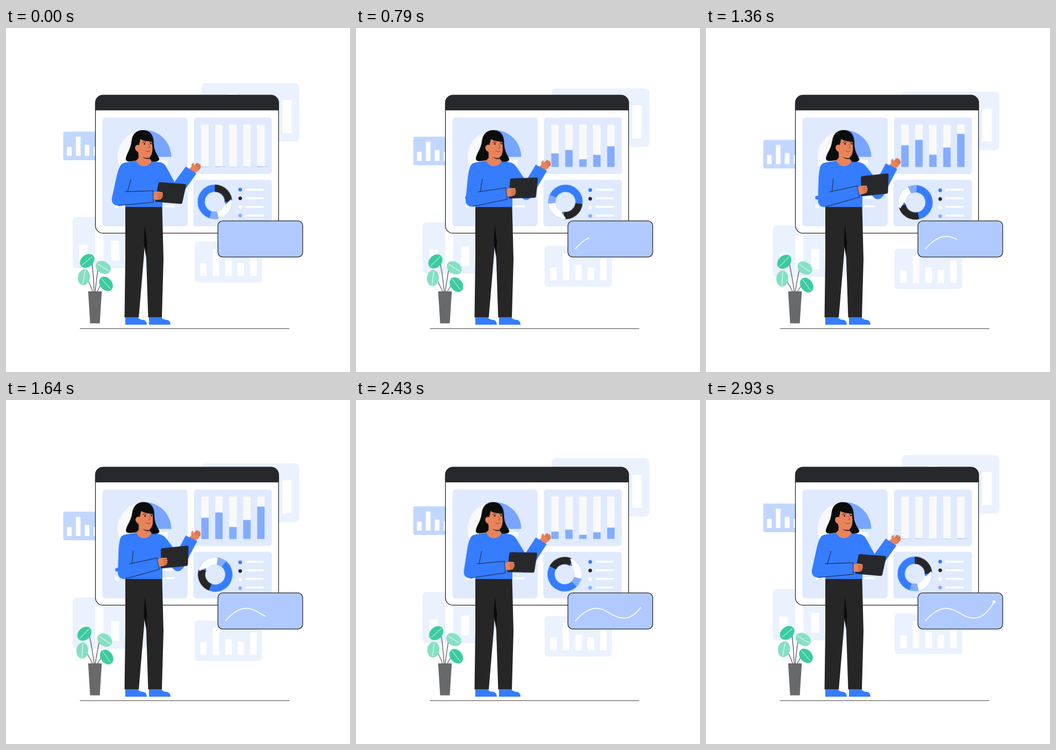
Write an HTML page without scripts that moves like this. It is 640x640 px and loops after 3 s.

```html
<!DOCTYPE html>
<html lang="en">
<head>
<meta charset="utf-8">
<title>Presenting a dashboard</title>
<style>
  html, body { margin: 0; width: 100%; height: 100%; overflow: hidden; background: #fff; }
  svg { display: block; width: 100%; height: 100%; }

  .drift, .sway, .grow rect { animation: 3s infinite; }
  .drift { --d: 16px; animation-name: drift; }
  .sway { animation-name: sway; }
  .grow rect { transform-origin: 0 258.6px; animation-name: grow; }
  .spin { transform-origin: 389px 324px; animation: spin 3s linear infinite; }
  .draw { stroke-dasharray: 1 2; animation: draw 3s linear infinite; }
  .end { animation: end 3s step-end infinite; }

  /* out and back, with a short rest before the loop restarts */
  @keyframes drift {
    0% { transform: none; animation-timing-function: cubic-bezier(.25, 0, .65, 1); }
    48.83% { transform: translateY(var(--d)); animation-timing-function: cubic-bezier(.35, 0, .75, 1); }
    97.67%, 100% { transform: none; }
  }
  @keyframes sway {
    0% { transform: rotate(0deg); animation-timing-function: cubic-bezier(.25, 0, .65, 1); }
    48.83% { transform: rotate(var(--a)); animation-timing-function: cubic-bezier(.35, 0, .75, 1); }
    97.67%, 100% { transform: rotate(0deg); }
  }
  @keyframes grow {
    0% { transform: scaleY(.02); animation-timing-function: cubic-bezier(.25, 0, .65, 1); }
    48.83% { transform: none; animation-timing-function: cubic-bezier(.35, 0, .75, 1); }
    97.67%, 100% { transform: scaleY(.02); }
  }
  @keyframes spin {
    97.67%, 100% { transform: rotate(360deg); }
  }
  @keyframes draw {
    0% { stroke-dashoffset: 1.05; }
    8.3% { stroke-dashoffset: 1.02; }
    16.67% { stroke-dashoffset: .902; }
    35.67% { stroke-dashoffset: .678; }
    54.67% { stroke-dashoffset: .44; }
    66.67% { stroke-dashoffset: .296; }
    81% { stroke-dashoffset: .08; }
    86.5%, 100% { stroke-dashoffset: 0; }
  }
  @keyframes end {
    0% { opacity: 0; }
    86.5%, 100% { opacity: 1; }
  }

  .pale { fill: #eaf1ff; }
  .panel { fill: #dfeaff; }
  .blue { fill: #357cff; }
  .soft { fill: #83acff; }
  .dark { fill: #26282b; }
  .white { fill: #fff; }
  .skin { fill: #e8835c; }
  .green { fill: #3ccba0; }
  .mint { fill: #86dfc4; }
  .line { fill: none; stroke: #1d1f22; stroke-width: 1; stroke-linecap: round; stroke-linejoin: round; }
  .rule { fill: none; stroke: #fff; stroke-width: 3.6; stroke-linecap: round; }
  .vein { stroke: #fff; stroke-width: .9; }
  .arm { transform-origin: 228px 258px; --a: -10.7deg; }
  .reach { transform-origin: 295px 256px; --a: -8.5deg; }
  .head { transform-origin: 257px 250px; --a: 2deg; }
  .plant .sway { transform-origin: 165px 490px; }
</style>
</head>
<body>
<svg viewBox="0 0 640 640">
  <defs>
    <g id="leaf">
      <ellipse rx="14.8" ry="11.2"/>
      <path class="vein" d="M-12.5 0H12.5"/>
    </g>
    <path id="shoe" d="M222 538.5H245Q250 543.5 256 543Q262 545 262 552H222Z"/>
  </defs>

  <!-- floating cards -->
  <g class="drift white">
    <rect class="pale" x="364" y="102.5" width="181.7" height="109" rx="8"/>
    <rect x="413" y="122" width="17.5" height="73"/>
    <rect x="514" y="134" width="17.5" height="61.5"/>
  </g>
  <g class="drift white" style="--d: 15.5px">
    <rect x="106.5" y="192.7" width="90" height="53.3" rx="4" fill="#c2d7ff"/>
    <path d="M113.5 221h8.7v17h-8.7zM130 202.3h8.7V238H130zM146.6 217.5h8.7V238h-8.7zM163 221h8.7v17H163z"/>
  </g>
  <g class="drift white">
    <rect class="pale" x="124" y="352" width="138" height="95" rx="7"/>
    <path d="M136.8 402.7h15.3V433h-15.3zM166 369.5h15.3V433H166zM195.6 396h15.3v37h-15.3z"/>
  </g>
  <g class="drift white" style="--d: 13px">
    <rect class="pale" x="351" y="397.5" width="125.3" height="75.5" rx="6"/>
    <path d="M361.3 437.5h12v24h-12zM384.6 411h12v50.5h-12zM408 432.3h12v29.2h-12zM431 437.3h12v24.2h-12zM454.3 419.5h12v42h-12z"/>
  </g>

  <!-- window -->
  <rect x="166.4" y="125.2" width="340.7" height="256.5" rx="14" fill="#fff" stroke="#26282b" stroke-width="1.3"/>
  <path class="dark" d="M165.8 153.2V139a14.5 14.5 0 0 1 14.5-14.4H493a14.5 14.5 0 0 1 14.7 14.4V153.2Z"/>
  <g class="panel">
    <rect x="179.3" y="166.4" width="158.7" height="202.6" rx="6"/>
    <rect x="349.8" y="166.4" width="144.8" height="105.4" rx="5"/>
    <rect x="348.6" y="282.4" width="146" height="86.6" rx="5"/>
  </g>

  <!-- pie and its key -->
  <path d="M257 190.5A49.5 49.5 0 0 0 257 289.5ZM258 245.5H302A44 44 0 0 1 258 289.5Z" fill="#f9f9fb"/>
  <path d="M257.5 190V239.7H307.5A50 50 0 0 0 257.5 190Z" fill="#78a5ff"/>
  <circle class="blue" cx="206.5" cy="315.7" r="3.4"/>
  <circle class="white" cx="206.5" cy="331.7" r="3.4"/>
  <path class="rule" d="M218 315.7H312.5M218 331.7H312.5"/>

  <!-- bars -->
  <path d="M363.3 179.4h13.8v79h-13.8zM389.3 179.4h13.8v79h-13.8zM415.3 179.4h13.8v79h-13.8zM441.3 179.4h13.8v79h-13.8zM467.3 179.4h13.8v79h-13.8z" fill="#f9f9fa"/>
  <g class="grow soft">
    <rect x="363.3" y="217.6" width="13.8" height="41"/>
    <rect x="389.3" y="207.4" width="13.8" height="51.2"/>
    <rect x="415.3" y="235.4" width="13.8" height="23.2"/>
    <rect x="441.3" y="221.9" width="13.8" height="36.7"/>
    <rect x="467.3" y="196.2" width="13.8" height="62.4"/>
  </g>

  <!-- ring and its key -->
  <g class="spin">
    <g transform="translate(388.5 323.4) rotate(-90)" fill="none" stroke-width="13.4">
      <circle r="25.3" pathLength="360" stroke="#357cff"/>
      <circle r="25.3" pathLength="360" stroke="#262626" stroke-dasharray="90 270"/>
      <circle r="25.3" pathLength="360" stroke="#fff" stroke-dasharray="77 283" stroke-dashoffset="-90"/>
      <circle r="25.3" pathLength="360" stroke="#83acff" stroke-dasharray="31 329" stroke-dashoffset="-167"/>
    </g>
  </g>
  <g class="drift" style="--d: 1.3px">
    <circle class="blue" cx="435.7" cy="300.7" r="3.4"/>
    <circle class="dark" cx="435.7" cy="316.8" r="3.4"/>
    <circle class="white" cx="435.7" cy="332.8" r="3.4"/>
    <circle class="soft" cx="435.7" cy="348.8" r="3.4"/>
  </g>
  <path class="rule" d="M447 300.7H478M447 316.7H478M447 332.7H478M447 348.7H478"/>

  <!-- trend card -->
  <rect x="394.3" y="358.8" width="157.7" height="67.4" rx="9" fill="#b0caff" stroke="#26282b" stroke-width="1.3"/>
  <path class="draw" pathLength="1" d="M408 411C422 395 434 388 446 387.6C467 387 477 406 499 405.8C516 405.5 527 391 536 376" fill="none" stroke="#fff" stroke-width="1.6" stroke-linecap="round"/>
  <circle class="end white" cx="536" cy="375.6" r="2.9"/>

  <path d="M137.5 559.3H527" stroke="#3a3a3a"/>

  <!-- plant -->
  <g class="plant">
    <g class="sway" style="--a: -5.5deg">
      <path class="line" d="M164 490Q163 462 160 438"/>
      <use class="green" href="#leaf" transform="translate(151 433.3) rotate(-40)"/>
    </g>
    <g class="sway" style="--a: 3.8deg">
      <path class="line" d="M166 490Q168 470 171 448"/>
      <use class="mint" href="#leaf" transform="translate(181 445.5) rotate(31)"/>
    </g>
    <g class="sway" style="--a: -7deg">
      <path class="line" d="M161 490Q158 480 153 470"/>
      <use class="mint" href="#leaf" transform="translate(145 463.7) rotate(-80)"/>
    </g>
    <g class="sway" style="--a: 6deg">
      <path class="line" d="M170 490Q173 484 177 476"/>
      <use class="green" href="#leaf" transform="translate(186 476) rotate(49)"/>
    </g>
    <path d="M152.8 490H178.2L174.5 549.5H156.5Z" fill="#68696b"/>
  </g>

  <!-- legs -->
  <use class="blue" href="#shoe"/>
  <use class="blue" href="#shoe" x="44"/>
  <path d="M222 332H290.5L293 430L290 538.5H264.5L261 430L258.5 398L256.5 425L247 538.5H220.5L222 430Z" fill="#262626"/>
  <path d="M259 367Q255.500 390 257 404L260.500 425L262.500 398Q260 385 259 367Z" fill="#0b0b0b"/>

  <!-- upper body -->
  <g class="reach sway">
    <path class="skin" d="M339 263L345 258.500C344 254 347 250.500 349.500 251.500L350 255.500L354.500 251Q357.500 249.800 357.500 252.500Q361 251.500 361.200 254.500Q363.300 256 362 258.500Q362.800 261.500 360 263C357 267 354 269 349 270Z"/>
    <path d="M357 252.800L353 257M361 255L355.500 259.500M362 259L357 262.500" fill="none" stroke="#7c3a26" stroke-width=".7"/>
    <path class="blue" d="M286 249.500C294 251 297 256 299 260L313.500 286.500L334.500 257.800L354.200 271L324 313C318 322 310 324 304 318L285 290Z"/>
  </g>
  <path class="blue" d="M244 246.500C234 249 225 249 218 251.500C213 254 212 259 212 262L222 300V333H291V300L296 262C296 254 291 250.500 284 249.500L270 247Z"/>

  <g class="head sway">
    <path d="M254.500 190C242 190 235 198 233.500 210C232 226 225 232 223 242C222 248.500 228 249 234 248L246 246L266 247C274 249.500 286 249.500 285 243C281 234 276 230 275 216C275 198 267 190 254.500 190Z" fill="#0b0c0c"/>
    <path class="skin" d="M246.500 228V242L242 247Q247 257 256 257.300Q266 257 271 247.500L267 243V234Z"/>
    <path d="M251 237Q257 243 266.500 241.500V243.500Q257 244.500 251 237Z" fill="#0b0c0c"/>
    <path class="skin" d="M247.500 218C240 215 236.500 226 245.500 230.500C248 238 255 242.200 264 241.500C271 240 272.300 232 272.500 224L271.500 211C263 211 255 210 250 206.500Q249 213 247.500 218Z"/>
    <g class="line" stroke-width=".8">
      <path d="M264.800 216Q268 221 267 222.300Q265.500 223.500 264 222.800" stroke="#7c3a26" stroke-width=".8"/>
      <path d="M259.500 228.300Q264 232 268 228.500" stroke="#7c3a26" stroke-width=".9"/>
      <path d="M253.500 213Q256 210.800 260 212.300M266.500 212.500Q269 210.800 271.500 212"/>
    </g>
    <circle cx="257.600" cy="215.600" r="1.400"/>
    <circle cx="269.500" cy="215" r="1.300"/>
  </g>

  <g class="arm sway">
    <path class="blue" d="M216 252.500C207 260 205 284 197.500 314C194.500 326 202 331 210 330.500L275 324.500L274 303L227 304L238 262Z"/>
    <path class="line" d="M232.500 281.500L226.300 304M222 304.500L274 302.800V324.300L209 330.300"/>
    <path class="dark" d="M286.500 286.800L332.500 290.300Q335.500 290.700 335 293.500L328 325Q327.300 327.400 325 327.200L279.500 323.500Q276.800 323 277.500 320.500L283.500 289Q284.200 286.600 286.500 286.800Z"/>
    <path class="skin" d="M274.500 306C280 303 285 304.500 290.500 305.500Q293 307 290.800 308.800Q293 310.500 291.300 312.500Q292.300 314.500 290 316Q290 318.300 287 318.800C282 320.500 278 320 274.500 318.500Z"/>
    <path d="M283 308.700H290.500M283 312.500H291M283 316H289.500" stroke="#7c3a26" stroke-width=".7"/>
  </g>
</svg>
</body>
</html>
```
